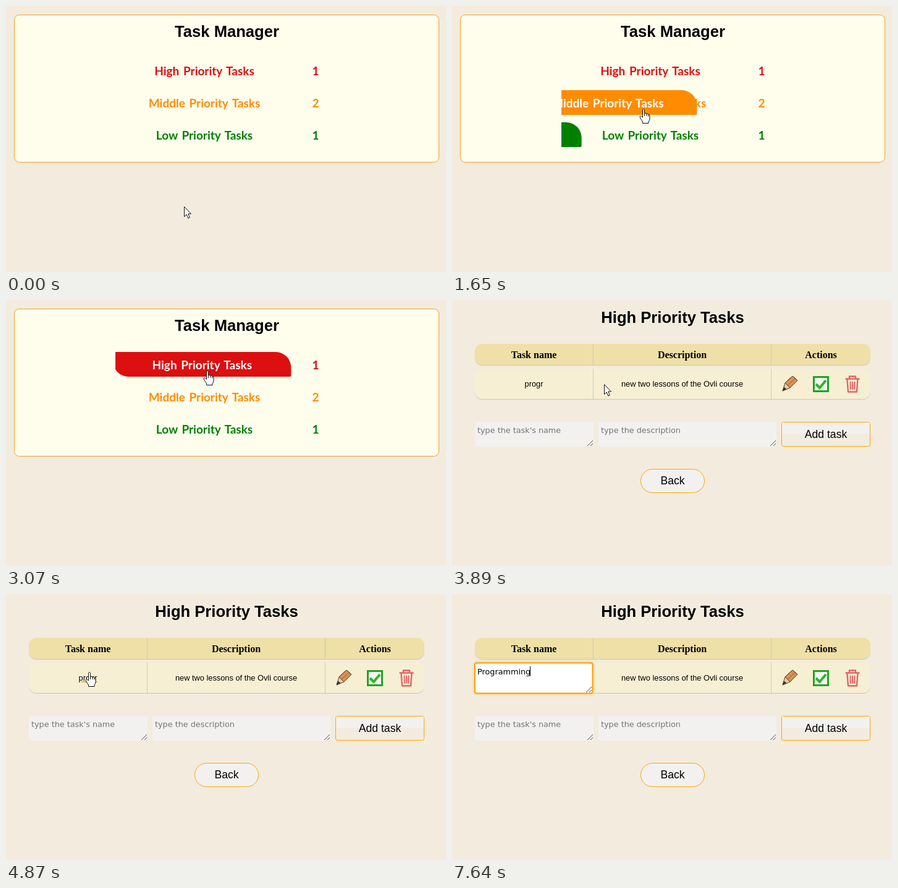
An HTML page that plays this animation: 712x430 px, repeating every 8 s.

```html
<!DOCTYPE html>
<html lang="en">
<head>
<meta charset="utf-8">
<title>Task Manager</title>
<style>
  html, body { margin: 0; height: 100%; overflow: hidden; background: #f2ebde; }
  svg { display: block; width: 100vw; height: 100vh; }
  .sans { font-family: "Liberation Sans", Arial, sans-serif; }
  .title { font-size: 25.6px; font-weight: bold; }
  .casual { font: 700 19px Lato, sans-serif; word-spacing: 2px; }
  .head { font: bold 16px "Liberation Serif", serif; }
  .cell { font-size: 12.8px; }
  .button { font-size: 17.6px; }
  .field { font: 12.8px "DejaVu Sans", sans-serif; }
  .mid { text-anchor: middle; }
  #editBox { filter: drop-shadow(0 0 2px #ffa50099); }
</style>
</head>
<body>
<svg viewBox="0 0 712 430">
  <defs>
    <clipPath id="barClip"><rect x="177" y="80" width="288" height="152"/></clipPath>
    <path id="grip" d="M-9 0L0-9M-4 0L0-4" stroke="#555" fill="none"/>
  </defs>

  <g id="menu">
    <rect x="13.5" y="14.5" width="687" height="238" rx="8" fill="#fffeed" stroke="#f7a022"/>
    <text class="sans title mid" x="357.5" y="50">Task Manager</text>
    <g id="rows" class="casual mid"></g>
  </g>

  <g id="list">
    <text class="sans title mid" x="357" y="37">High Priority Tasks</text>

    <rect x="37" y="72" width="640" height="34" rx="12" fill="#c9c5c0"/>
    <rect x="37" y="71" width="640" height="34" rx="12" fill="#eee0a6"/>
    <rect x="37" y="112" width="640" height="49" rx="12" fill="#c9c5c0"/>
    <rect x="37" y="111" width="640" height="49" rx="12" fill="#f7efd3"/>
    <path d="M228.5 71V105M516.5 71V105M228.5 111V160M516.5 111V160" stroke="#cbc8c8"/>
    <g class="head mid">
      <text x="132.5" y="93.5">Task name</text>
      <text x="372.5" y="93.5">Description</text>
      <text x="597" y="93.5">Actions</text>
    </g>
    <text class="sans cell mid" x="372.5" y="140">new two lessons of the Ovli course</text>
    <g id="plainName">
      <text class="sans cell mid" x="132.5" y="140">progr</text>
      <path id="underline" d="M122 142H134M142 142H148" stroke="#ff9800" stroke-width="1.6"/>
    </g>

    <g id="pencil" stroke-linejoin="round" stroke="#4b3c32">
      <path d="M535 147L539 134L551 123L559 130L547 142Z" fill="#f0c99b"/>
      <path d="M539 134L551 123L559 130L547 142L543 138Z" fill="#d99055"/>
      <path d="M543 138L555 127" stroke="#a5602f"/>
      <path d="M535 147L537 141L541 144Z" fill="#333"/>
    </g>
    <rect x="585.5" y="124.500" width="23" height="23" fill="#f4f8ee" stroke="#23a127" stroke-width="3"/>
    <path d="M589 136L595 142L605 130" fill="none" stroke="#2db52a" stroke-width="4"/>
    <g fill="none" stroke="#e06565" stroke-width="2.4" stroke-linecap="round" stroke-linejoin="round">
      <path d="M637.500 127.500H658.500M643 127V123.500H653V127M639.500 128L641 148.500H655L656.500 128"/>
      <path d="M644.500 132.500L645 144M648 132.500V144M651.500 132.500L651 144" stroke-width="2"/>
    </g>

    <g class="field" fill="#757575">
      <rect x="37" y="197" width="192" height="40" rx="3" fill="#f3f1f0"/>
      <rect x="237" y="197" width="288" height="40" rx="3" fill="#f3f1f0"/>
      <text x="41" y="215">type the task's name</text>
      <text x="241" y="215">type the description</text>
      <use href="#grip" x="228" y="236"/>
      <use href="#grip" x="524" y="236"/>
    </g>

    <g class="sans button mid">
      <rect x="533.5" y="197.500" width="143" height="39" rx="3" fill="#f2ecdf" stroke="#ffa500"/>
      <rect x="534" y="198" width="142" height="18" rx="2" fill="#f3f1f0"/>
      <text x="605" y="223">Add task</text>
      <rect x="305.500" y="273.500" width="103" height="38" rx="19" fill="#f3f1f0" stroke="#ffa500"/>
      <text x="357" y="298">Back</text>
    </g>

    <g id="editor" class="field">
      <rect x="36" y="110" width="193" height="52" fill="#f2ebde"/>
      <rect id="editBox" x="37" y="111.500" width="190.500" height="49" rx="3" fill="#fff" stroke="#ff9d0a" stroke-width="2"/>
      <use href="#grip" x="226" y="159"/>
      <rect id="selection" x="41" y="116" height="19" fill="#3297fd"/>
      <text id="typed" x="41" y="130"></text>
      <path id="caret" d="M.5 117V133" stroke="#000"/>
    </g>
  </g>

  <g id="cursor" fill="#fff" stroke="#111" stroke-linejoin="round">
    <path id="arrow" d="M.5.5V16.500L4.200 13L6.800 19L9.300 18L6.800 12H11.500Z"/>
    <g id="hand">
      <path d="M-1.500 14V1.500Q0-1 1.500 1.500V8Q3 6 5 8.500Q7 7 8 9.500Q10 9 10 11V16Q10 19 8 21V23.500H-1.500V21L-5.500 15Q-7 12-4.500 11.500Z"/>
      <path d="M1.500 8V12M5 8.500V12M8 9.500V12.500" fill="none"/>
    </g>
    <path id="beam" d="M-3-8H3M0-8V8M-3 8H3" fill="none"/>
  </g>
</svg>

<script>
const LOOP = 8000, OPEN_LIST = 3620, EDIT = 5130, SELECT = 5400, BAR_WIDTH = 288, SLIDE = 500;
const $ = id => document.getElementById(id);
const show = (id, on) => $(id).style.display = on ? "" : "none";

const rows = [
  { label: "High Priority Tasks", count: 1, color: "#dc1010", top: 84, enter: 2645, leave: LOOP },
  { label: "Middle Priority Tasks", count: 2, color: "#ff8c00", top: 136, enter: 1420, leave: 2545 },
  { label: "Low Priority Tasks", count: 1, color: "#008000", top: 188, enter: 385, leave: 1350 }
];

// Time, x, y of the pointer's hot spot
const pointerPath = [
  [0, 288, 324], [70, 288, 324], [385, 299, 228], [600, 303, 215], [810, 305, 211],
  [1250, 305, 211], [1350, 307, 188], [1420, 308, 176], [1700, 311, 164], [2160, 312, 164],
  [2545, 314, 135], [2645, 317, 124], [2890, 326, 114], [3290, 326, 114], [3460, 330, 106],
  [3620, 330, 106], [4060, 193, 155], [4420, 211, 134], [4510, 211, 134], [4870, 135, 126],
  [5130, 135, 126], [5400, 60, 126]
];

const typing = [
  [EDIT, "progr"], [6540, "P"], [6620, "Pr"], [6710, "Pro"], [6880, "Prog"], [7080, "Progra"],
  [7210, "Program"], [7390, "Programm"], [7470, "Programmi"], [7560, "Programmin"], [7640, "Programming"]
];

$("rows").innerHTML = rows.map(({ label, count, color, top }, i) => `
  <g fill="${color}">
    <text x="321" y="${top + 27.5}">${label}</text>
    <text x="501" y="${top + 27.5}">${count}</text>
    <g clip-path="url(#barClip)"><g id="bar${i}">
      <path d="M177 ${top}h263a25 25 0 0 1 25 25v13a2 2 0 0 1-2 2h-261a25 25 0 0 1-25-25z"/>
      <text id="barLabel${i}" x="321" y="${top + 27.5}" fill="#fff">${label}</text>
    </g></g>
  </g>`).join("");

// cubic-bezier(.25, .1, .25, 1)
function ease(x) {
  if (x <= 0 || x >= 1) return x <= 0 ? 0 : 1;
  const curve = (a, b, s) => 3 * a * s * (1 - s) ** 2 + 3 * b * s * s * (1 - s) + s ** 3;
  let low = 0, high = 1;
  for (let i = 0; i < 20; i++) {
    const s = (low + high) / 2;
    if (curve(.25, .25, s) < x) low = s; else high = s;
  }
  return curve(.1, 1, low);
}

function pointerAt(t) {
  const next = pointerPath.findIndex(p => p[0] > t);
  if (next < 0) return pointerPath.at(-1).slice(1);
  const [t0, x0, y0] = pointerPath[next - 1], [t1, x1, y1] = pointerPath[next];
  const k = (t - t0) / (t1 - t0);
  return [x0 + (x1 - x0) * k, y0 + (y1 - y0) * k];
}

function drawMenu(t) {
  rows.forEach(({ enter, leave }, i) => {
    const shown = ease((t - enter) / SLIDE) - ease((t - leave) / SLIDE);
    $("bar" + i).setAttribute("transform", `translate(${(shown - 1) * BAR_WIDTH} 0)`);
    show("bar" + i, shown > 0);
    show("barLabel" + i, t >= enter && t < leave);
  });
}

function drawEditor(t) {
  const selected = t >= SELECT && t < typing[1][0];
  const typed = $("typed");
  typed.textContent = typing.findLast(([time]) => time <= t)[1];
  typed.setAttribute("fill", selected ? "#fff" : "#000");
  const width = typed.getComputedTextLength();
  $("selection").setAttribute("width", width);
  $("caret").setAttribute("transform", `translate(${Math.round(41 + width) - 1} 0)`);
  show("selection", selected);
  show("caret", !selected);
}

function drawPointer(t) {
  const [x, y] = pointerAt(t);
  const overName = t >= OPEN_LIST && x < 228 && y > 111 && y < 160;
  const overRow = t < OPEN_LIST && rows.some(r => t >= r.enter && t < r.leave);
  const kind = t >= EDIT ? "beam" : overName || overRow ? "hand" : "arrow";
  for (const id of ["arrow", "hand", "beam"]) show(id, id === kind);
  show("cursor", t < SELECT);
  show("underline", overName);
  $("cursor").setAttribute("transform", `translate(${Math.round(x)} ${Math.round(y)})`);
}

function draw() {
  const t = performance.now() % LOOP;
  const listOpen = t >= OPEN_LIST, editing = t >= EDIT;
  show("menu", !listOpen);
  show("list", listOpen);
  show("plainName", !editing);
  show("editor", editing);
  if (!listOpen) drawMenu(t);
  if (editing) drawEditor(t);
  drawPointer(t);
  requestAnimationFrame(draw);
}
draw();
</script>
</body>
</html>
```
